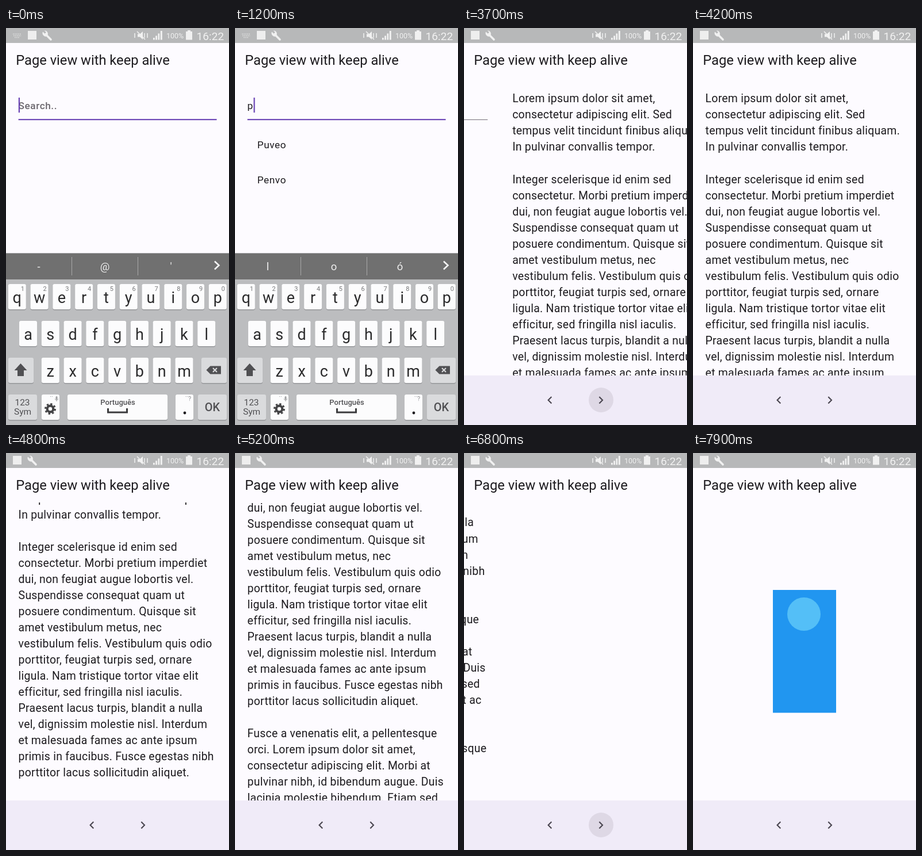
Write an HTML page that moves like this. It is 388 by 690 pixels and loops after 8000 ms.

```html
<!DOCTYPE html>
<html lang="en">
<head>
<meta charset="utf-8">
<title>Page view with keep alive</title>
<style>
  html, body { margin: 0; width: 100%; height: 100%; overflow: hidden; background: #fdfbff; }
  svg { display: block; width: 388px; height: 690px; font-family: Roboto, sans-serif; fill: #1d1b1f; }
  .body { font-size: 19.4px; letter-spacing: .27px; }
  .item { font-size: 17.25px; letter-spacing: .54px; }
  .key { font-size: 27px; fill: #2b2b2c; }
  .mid { text-anchor: middle; }
  .line { fill: none; }
</style>
</head>
<body>
<svg viewBox="0 0 388 690">
  <clipPath id="view"><rect y="86" width="388" height="518"/></clipPath>
  <rect width="388" height="690" fill="#fdfbff"/>

  <g clip-path="url(#view)">
    <g id="searchPage">
      <text id="hint" class="item" x="21.6" y="141" font-weight="500" style="fill:#6b676e">Search..</text>
      <g id="results" class="item">
        <text x="21.6" y="141.3">p</text>
        <text x="38.8" y="209">Puveo</text>
        <text x="38.8" y="269.5">Penvo</text>
      </g>
      <rect id="underline" x="21.6" width="345"/>
      <rect id="cursor" y="121" width="2.2" height="26" fill="#6a43b5"/>
    </g>
    <g id="textPage"><g id="scroller" class="body"></g></g>
    <g id="imagePage">
      <rect x="139" y="238" width="110" height="213.5" fill="#2196f0"/>
      <circle cx="193" cy="280" r="29" fill="#54bff7"/>
    </g>
  </g>

  <text x="17.2" y="64" font-size="23.7">Page view with keep alive</text>

  <rect y="603.8" width="388" height="86.2" fill="#f0ebf8"/>
  <circle id="ripple" cx="238.5" cy="646.5" r="21.5" fill="#ded8e5"/>
  <path class="line" d="M152.3 641l-5.7 5.8 5.7 5.8M235.3 641l5.7 5.8-5.7 5.8" stroke="#49454f" stroke-width="2.1"/>

  <g id="keyboard"></g>

  <rect width="388" height="26" fill="#b7b8b9"/>
  <g fill="#f1f1f1">
    <g id="typing" fill="none" stroke="#dedede" stroke-width="1.6" stroke-dasharray="1.8 1.2">
      <path d="M12 10.5h15M13 13.5h13M15 16.5h9"/>
    </g>
    <g id="notices">
      <rect x="12" y="5" width="15" height="15" fill="#eeeeee"/>
      <path d="M44 12l8 8" stroke="#f1f1f1" stroke-width="3.6" stroke-linecap="round"/>
      <path d="M38 6.5l3.5 3.3 2.4-2.2-3.2-3.2a5.8 5.8 0 0 1 5.6 8.3l-2.5 2a5.8 5.8 0 0 1-5.8-8.2z"/>
    </g>
    <path d="M229 10.5h4l5-4.5v14l-5-4.5h-4z"/>
    <path class="line" d="M228 6l14 14M224 9v8M246 9v8M241 9v8" stroke="#f1f1f1" stroke-width="1.5"/>
    <path d="M256 17h2.8v3.5H256zM260.2 13.5h2.8v7h-2.8zM264.4 9.5h2.8v11h-2.8zM268.8 5h3v15.500h-3z"/>
    <text x="279" y="18" font-size="12.500">100%</text>
    <path d="M316 4h5v2h3v14.500h-11V6h3z"/>
    <text x="331.500" y="20.500" font-size="19.200">16:22</text>
  </g>
</svg>
<script>
const DURATION = 8000, STEP = 100, WIDTH = 388;
const el = id => document.getElementById(id);

const copy = `Lorem ipsum dolor sit amet,
consectetur adipiscing elit. Sed
tempus velit tincidunt finibus aliquam.
In pulvinar convallis tempor.

Integer scelerisque id enim sed
consectetur. Morbi pretium imperdiet
dui, non feugiat augue lobortis vel.
Suspendisse consequat quam ut
posuere condimentum. Quisque sit
amet vestibulum metus, nec
vestibulum felis. Vestibulum quis odio
porttitor, feugiat turpis sed, ornare
ligula. Nam tristique tortor vitae elit
efficitur, sed fringilla nisl iaculis.
Praesent lacus turpis, blandit a nulla
vel, dignissim molestie nisl. Interdum
et malesuada fames ac ante ipsum
primis in faucibus. Fusce egestas nibh
porttitor lacus sollicitudin aliquet.

Fusce a venenatis elit, a pellentesque
orci. Lorem ipsum dolor sit amet,
consectetur adipiscing elit. Morbi at
pulvinar nibh, id bibendum augue. Duis
lacinia molestie bibendum. Etiam sed
est eget ipsum tincidunt fringilla et ac
ex. Fusce tristique lacus at neque
congue venenatis. Ut non egestas
massa, sit amet varius metus. Quisque
nisi justo, tristique ac congue id,
aliquet vitae ligula.`;
el('scroller').innerHTML = copy.split('\n')
  .map((line, i) => `<text x="21.6" y="${129.3 + i * 28.04}">${line}</text>`).join('');

const label = (x, y, size, text, fill, extra = '') =>
  `<text class="mid" x="${x}" y="${y}" font-size="${size}" fill="${fill}" ${extra}>${text}</text>`;
const keycap = (x, y, width, fill = '#fcfcfd') =>
  `<rect x="${x}" y="${y + 1.5}" width="${width}" height="44" rx="3" fill="#96979a"/>
   <rect x="${x}" y="${y}" width="${width}" height="44" rx="3" fill="${fill}"/>`;
const keyRow = (letters, left, y, digits = '') => [...letters].map((letter, i) => {
  const x = left + i * 38.78;
  return keycap(x, y, 31) +
    `<text class="key mid" x="${x + 15.5}" y="${y + 32.5}">${letter}</text>` +
    (digits ? label(x + 25, y + 11.5, 11, digits[i], '#77787a') : '');
}).join('');
const dark = '#505053', grey = '#dadbdd';

el('keyboard').innerHTML = `
  <rect y="391.500" width="388" height="298.500" fill="#bcbdbf"/>
  <rect y="391.500" width="388" height="45.500" fill="#707070"/>
  <path class="line" d="M114.500 398v32M229.500 398v32" stroke="#a9a9a9"/>
  <path class="line" d="M363 405.500l7.500 7-7.500 7" stroke="#f5f5f5" stroke-width="2.6"/>
  ${[57, 172, 287].map(x => label(x, 420.5, 18.5, '', '#eeeeee', 'data-suggestion')).join('')}
  ${keyRow('qwertyuiop', 3.8, 445, '1234567890')}
  ${keyRow('asdfghjkl', 23, 509)}
  ${keyRow('zxcvbnm', 61.8, 573)}
  ${keycap(4, 573, 44, grey)}${keycap(340, 573, 44, grey)}
  ${keycap(4, 637, 50, grey)}${keycap(334, 637, 50, grey)}
  ${keycap(62, 637, 31)}${keycap(107, 637, 174)}${keycap(295, 637, 31)}
  <path d="M25.500 583l11 12h-5.500v10h-11v-10h-5.500z" fill="${dark}"/>
  <path d="M348.500 594.500l7-7h18.500v14h-18.500z" fill="${dark}"/>
  <path class="line" d="M360 591l7 7m0-7l-7 7" stroke="${grey}" stroke-width="2"/>
  ${label(28.5, 656, 15.5, '123', dark)}${label(29, 671.5, 15.5, 'Sym', dark)}
  ${label(359, 665.5, 20, 'OK', dark, 'font-weight="500"')}
  ${label(194.5, 654.5, 13, 'Português', dark, 'font-weight="500"')}
  <path class="line" d="M177.500 661v7h33v-7" stroke="#3b3b3d" stroke-width="3"/>
  <circle cx="311" cy="669" r="2.400"/>
  ${label(317, 648, 11, '˙˙?', '#909194')}
  <g class="line" stroke="#444446">
    <circle cx="77" cy="662" r="5.300" stroke-width="4.200"/>
    <circle cx="77" cy="662" r="8.500" stroke-width="3" stroke-dasharray="3.338"/>
  </g>
  ${label(79, 648, 11, '˙˙', '#909194')}
  <rect x="86.500" y="640" width="3" height="6" rx="1.500" fill="#a0a1a3"/>
  <path class="line" d="M85 644.500q3 5 6 0M88 647v2" stroke="#a0a1a3"/>`;
const suggestions = document.querySelectorAll('[data-suggestion]');

const clamp = v => Math.min(1, Math.max(0, v));
const progress = (t, start, length) => clamp((t - start) / length);
const easeOut = (p, power) => 1 - (1 - p) ** power;
const show = (id, on) => el(id).setAttribute('visibility', on ? 'visible' : 'hidden');
const move = (id, x, y) => el(id).setAttribute('transform', `translate(${x} ${y})`);
const set = (id, attrs) => Object.entries(attrs).forEach(([k, v]) => el(id).setAttribute(k, v));

function draw(t) {
  const typed = t >= 400, focused = t < 2200;

  show('hint', !typed);
  show('results', typed);
  show('cursor', focused && t < 1700);
  set('cursor', { x: typed ? 32.4 : 21.8 });
  set('underline', focused
    ? { y: 158.1, height: 2.1, fill: '#6a43b5' }
    : { y: 158.8, height: 1.1, fill: '#79747e' });
  suggestions.forEach((s, i) => s.textContent = (typed ? 'loó' : "-@'")[i]);

  show('typing', focused);
  move('notices', focused ? 26 : 0, 0);
  move('keyboard', 0, 300 * progress(t, 2400, 300));

  const page = easeOut(progress(t, 3600, 300), 4.5) + easeOut(progress(t, 6700, 300), 4.5);
  ['searchPage', 'textPage', 'imagePage'].forEach((id, i) => move(id, (i - page) * WIDTH, 0));
  const scroll = 252 * easeOut(progress(t, 4600, 900), 2) +
    170.4 * easeOut(progress(t, 5500, 300), 2.75);
  move('scroller', 0, -scroll);
  show('imagePage', t >= 7700);

  const pressed = t >= 6800 ? 6800 : 3700;
  set('ripple', { opacity: t < pressed ? 0 : 1 - progress(t, pressed, 300) });
}

function tick(now) {
  draw(Math.floor(now % DURATION / STEP) * STEP);
  requestAnimationFrame(tick);
}
tick(performance.now());
</script>
</body>
</html>
```
